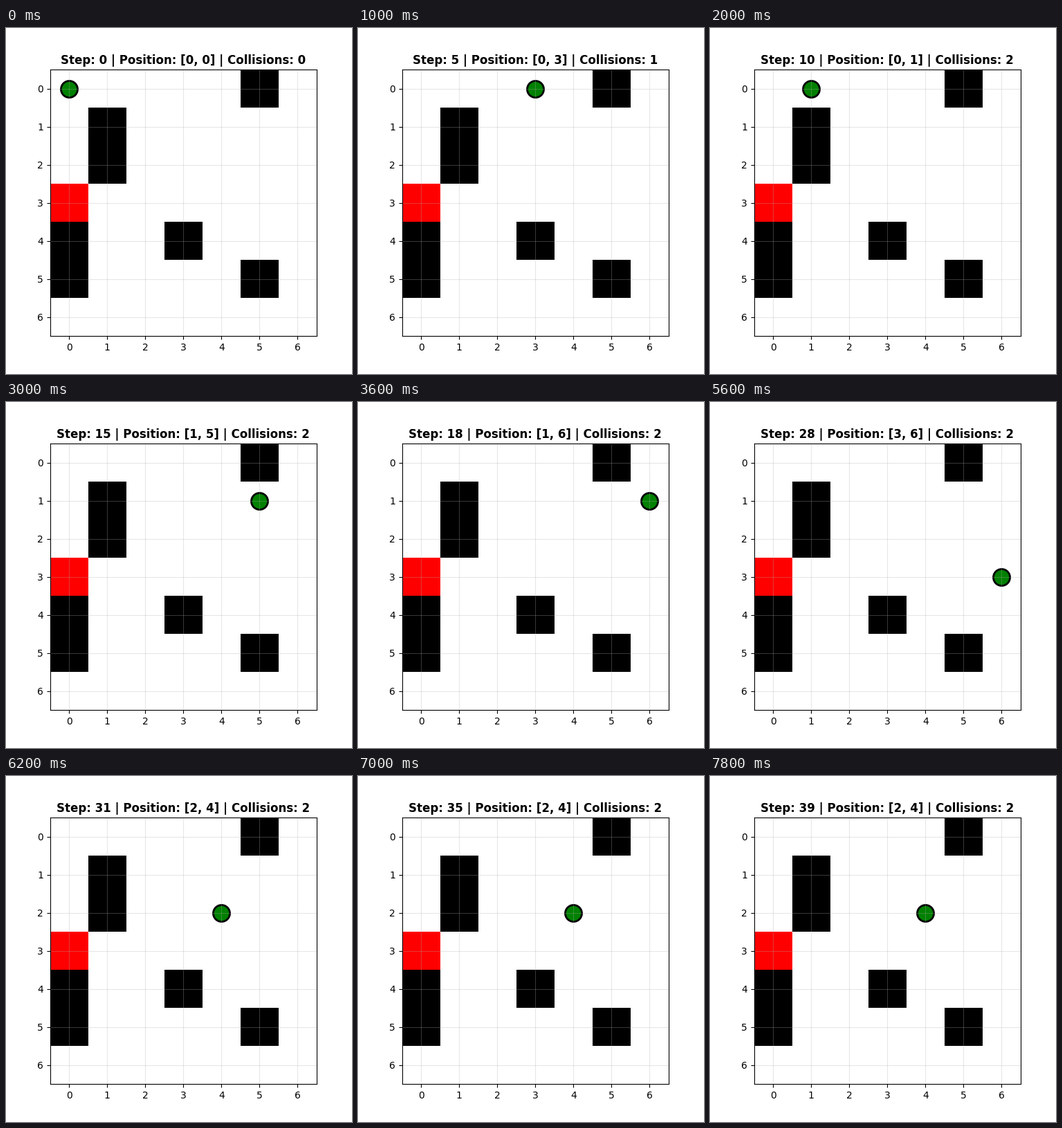
Recreate the animation shown at these times as a matplotlib script. Size 500 px wide and 500 px high, loop 8 s.

```python
import numpy as np
import matplotlib.pyplot as plt
from matplotlib.animation import FuncAnimation

SIZE = 7
WALLS = [(0, 5), (1, 1), (2, 1), (4, 0), (4, 3), (5, 0), (5, 5)]
GOAL = (3, 0)
STEPS = {"U": (-1, 0), "D": (1, 0), "L": (0, -1), "R": (0, 1)}
MOVES = "URDRRLLDLR" "RRDRR" "RUDUURD" "RRDLRD" "ULLUDRL" "LRRL"


def walk(moves):
    """Return (row, col, collisions) before the first move and after each one."""
    row = col = hits = 0
    states = [(row, col, hits)]
    for move in moves:
        dr, dc = STEPS[move]
        r = min(max(row + dr, 0), SIZE - 1)
        c = min(max(col + dc, 0), SIZE - 1)
        if (r, c) in WALLS:
            hits += 1
        else:
            row, col = r, c
        states.append((row, col, hits))
    return states


states = walk(MOVES)

grid = np.ones((SIZE, SIZE, 3))
for cell in WALLS:
    grid[cell] = 0
grid[GOAL] = (1, 0, 0)

fig, ax = plt.subplots(figsize=(5, 5), dpi=100)
ax.imshow(grid, interpolation="nearest")
ax.set_xticks(range(SIZE))
ax.set_yticks(range(SIZE))
ax.grid(True, alpha=0.3)
agent = ax.scatter([0], [0], s=300, c="green", edgecolors="black", linewidths=2)
title = ax.set_title("", fontsize=12, fontweight="bold")


def update(step):
    row, col, hits = states[step]
    agent.set_offsets([(col, row)])
    title.set_text(f"Step: {step} | Position: [{row}, {col}] | Collisions: {hits}")
    return agent, title


anim = FuncAnimation(fig, update, frames=len(states), interval=200,
                     repeat=True, repeat_delay=0, blit=False)
plt.show()
```
